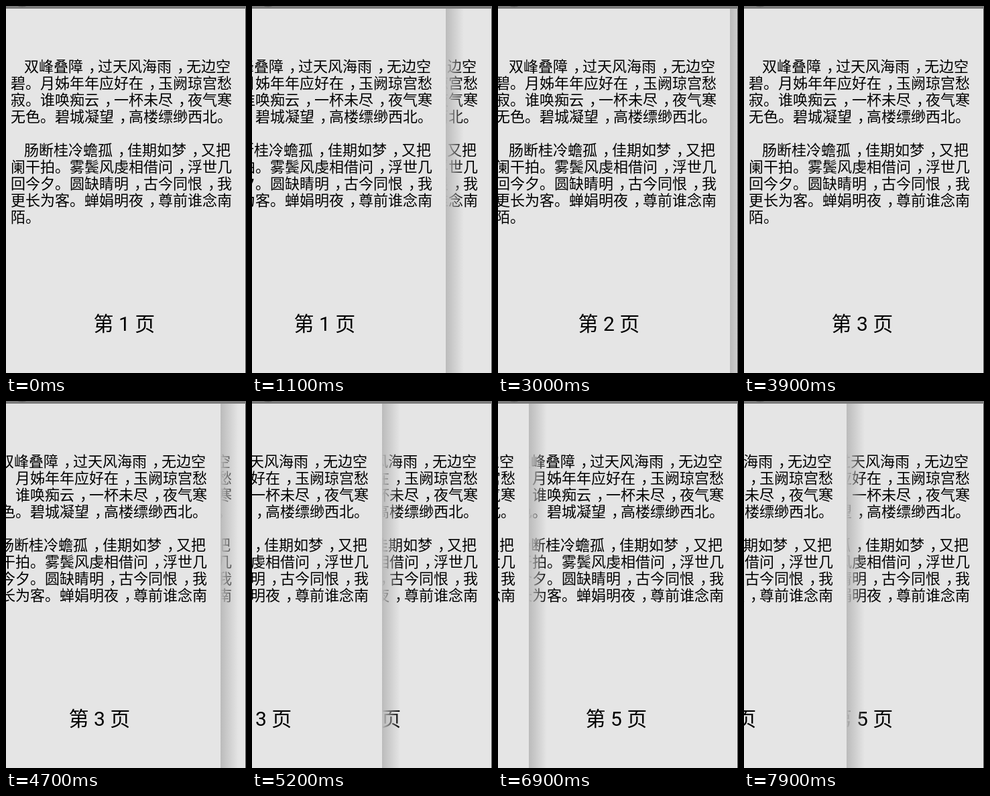
Recreate the animation shown at these times as an HTML page. Size 358x548 px, loop 8000 ms.

```html
<!DOCTYPE html>
<html lang="zh-CN">
<head>
<meta charset="utf-8">
<style>
  html, body { margin: 0; width: 100%; height: 100%; overflow: hidden; background: #e5e5e5; }
  svg { display: block; width: 358px; height: 548px; overflow: hidden; }
  text { font: 22px "Noto Sans CJK SC", "Noto Sans CJK", sans-serif; fill: #000; text-spacing-trim: space-all; }
  .number { font: 30px Roboto, "Noto Sans CJK SC", "Noto Sans CJK", sans-serif; text-anchor: middle; }
</style>
</head>
<body>
<svg viewBox="0 0 358 548">
  <defs>
    <linearGradient id="fade">
      <stop offset="0" stop-color="#bbb"/>
      <stop offset="1" stop-color="#bbb" stop-opacity="0"/>
    </linearGradient>
  </defs>
  <g id="under"></g>
  <rect id="shadow" width="27" height="548" fill="url(#fade)"/>
  <g id="upper"></g>
  <rect width="358" height="4" fill="#7b7b7b"/>
  <ellipse cx="24" cy="0" rx="6" ry="1.5" fill="#606060"/>
  <rect x="357" y="4" width="1" height="544" fill="#4a4a4a"/>
</svg>
<script>
const WIDTH = 357, LOOP = 8000, STEP = 100;

const lines = [
  '双峰叠障，过天风海雨，无边空',
  '碧。月姊年年应好在，玉阙琼宫愁',
  '寂。谁唤痴云，一杯未尽，夜气寒',
  '无色。碧城凝望，高楼缥缈西北。',
  '',
  '肠断桂冷蟾孤，佳期如梦，又把',
  '阑干拍。雾鬓风虔相借问，浮世几',
  '回今夕。圆缺睛明，古今同恨，我',
  '更长为客。蝉娟明夜，尊前谁念南',
  '陌。'
];

// Each turn: the page on top, then [time, x of its right edge].
const turns = [
  { page: 1, keys: [[900, 328], [1700, 170], [2100, 0]] },
  { page: 2, keys: [[3000, 346], [3800, 52], [3900, 0]] },
  { page: 3, keys: [[4600, 345], [5200, 194], [5400, 126], [5600, 0]] },
  { page: 4, keys: [[6200, 350], [6300, 323], [7000, 0]] },
  { page: 4, keys: [[7500, 30], [8000, 184]] }
];

const [under, shadow, upper] = ['under', 'shadow', 'upper'].map(id => document.getElementById(id));

// Commas sit in the middle of their cell.
const centreCommas = s => s.replace(/，(.)/g, '<tspan dx="8">，</tspan><tspan dx="-8">$1</tspan>');

const pageMarkup = '<rect width="357" height="548" fill="#e5e5e5"/>' +
  lines.map((line, i) =>
    `<text x="${i % 5 ? 7 : 27}" y="${98 + 25 * i}">${centreCommas(line)}</text>`).join('') +
  '<text class="number" x="176.4" y="485"></text>';

for (const page of [under, upper]) page.innerHTML = pageMarkup;

function setNumber(page, n) {
  page.querySelector('.number').textContent = `第 ${n} 页`;
}

function interpolate(keys, t) {
  const i = keys.findIndex(key => key[0] > t);
  const [t0, x0] = keys[i - 1], [t1, x1] = keys[i];
  return x0 + (x1 - x0) * (t - t0) / (t1 - t0);
}

function stateAt(t) {
  let page = 1;
  for (const turn of turns) {
    if (t < turn.keys[0][0]) break;
    if (t < turn.keys.at(-1)[0]) return { page: turn.page, edge: Math.round(interpolate(turn.keys, t)) };
    page = turn.page + 1;
  }
  return { page, edge: WIDTH };
}

function draw(now) {
  const t = Math.floor(now % LOOP / STEP) * STEP;
  const { page, edge } = stateAt(t);
  setNumber(upper, page);
  setNumber(under, page + 1);
  upper.setAttribute('transform', `translate(${edge - WIDTH} 0)`);
  shadow.setAttribute('x', edge);
  requestAnimationFrame(draw);
}

draw(performance.now());
</script>
</body>
</html>
```
